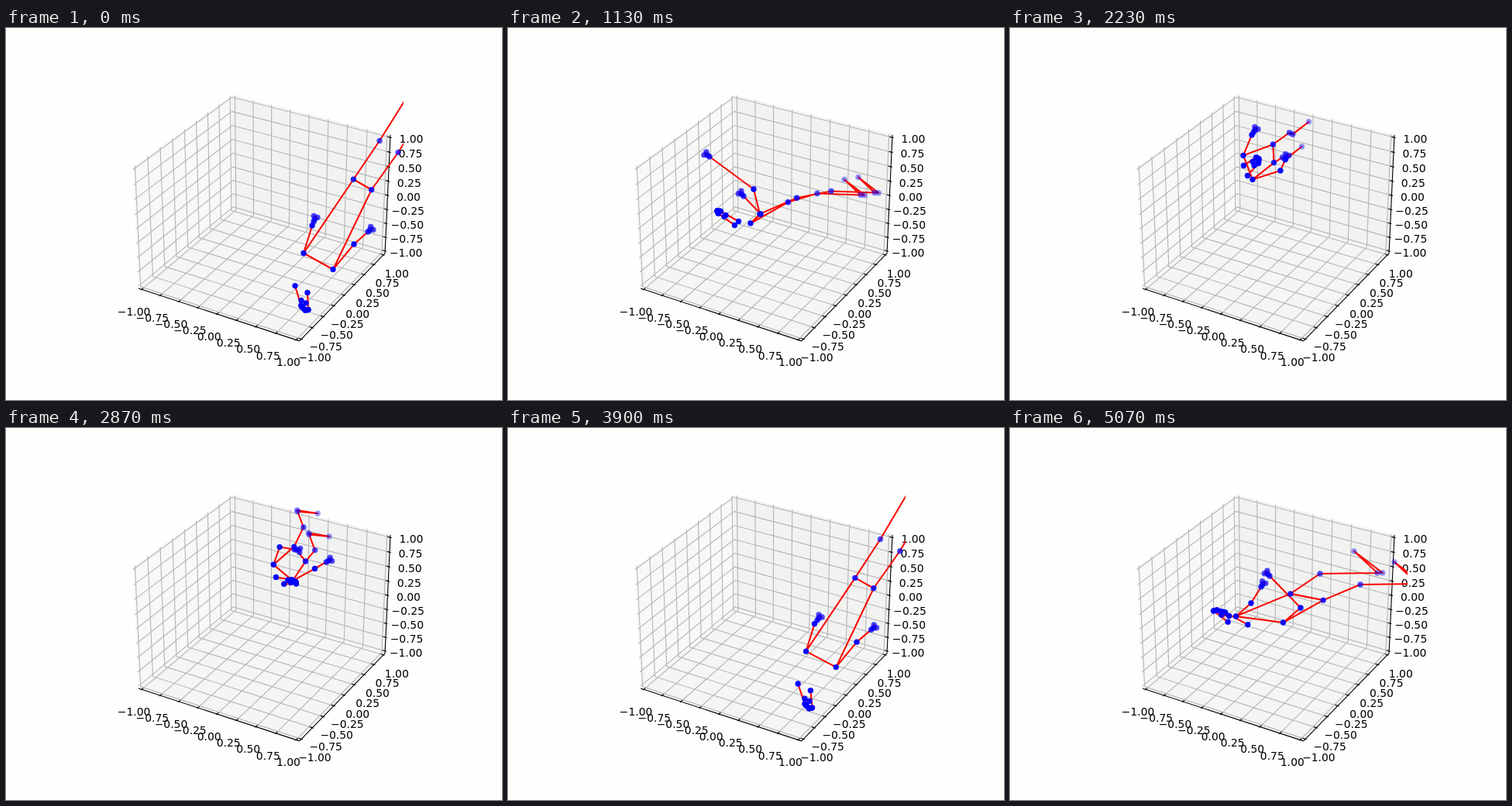
An HTML page for the animation above (5.11 s loop, 640 by 480 pixels).

```html
<!DOCTYPE html>
<html lang="en">
<head>
<meta charset="utf-8">
<title>3D pose plot</title>
<style>
  html, body { margin: 0; width: 100%; height: 100%; overflow: hidden; background: #fefefd; }
  svg { display: block; width: 100vw; height: 100vh; }
  text { font: 13.89px "DejaVu Sans", sans-serif; text-anchor: middle; }
</style>
</head>
<body>
<svg id="stage" viewBox="0 0 640 480">
  <clipPath id="axesArea"><rect x="143.2" y="57.6" width="369.6" height="369.6"/></clipPath>
  <g id="box"></g>
  <g id="figure" clip-path="url(#axesArea)">
    <path id="bones" fill="none" stroke="#fa0a00" stroke-width="2.08" stroke-linejoin="round" stroke-linecap="square"/>
  </g>
</svg>
<script>
const byId = id => document.getElementById(id);

function make(parent, tag, attrs) {
  const el = document.createElementNS('http://www.w3.org/2000/svg', tag);
  for (const key in attrs) el.setAttribute(key, attrs[key]);
  return parent.appendChild(el);
}

// ---- Axes box: perspective camera at elevation 30°, azimuth -60° ----
const EDGE = 25 / 24;
const TICKS = Array.from({ length: 9 }, (_, i) => i / 4 - 1);
const box = byId('box');

function project([x, y, z]) {
  x *= 4 / 7; y *= 4 / 7; z *= 3 / 7;
  const s = Math.sqrt(3) / 2;
  const right = s * x + y / 2;
  const up = -x / 4 + s / 2 * y + s * z;
  const scale = 1997.8 / (10 - (s / 2 * x - 0.75 * y + z / 2));
  return [333 + right * scale, 237.4 - up * scale];
}

const format = p => p.map(v => v.toFixed(2)).join(' ');
const polyline = points => 'M' + points.map(format).join('L');
const path = points => polyline(points.map(project));

function line(points, stroke) {
  make(box, 'path', { d: path(points), fill: 'none', stroke, 'stroke-width': 1.11 });
}

function pane(points, fill) {
  make(box, 'path', { d: path(points) + 'Z', fill });
}

function axis(from, to, at, tickDir, [dx, dy]) {
  line([from, to], '#000');
  for (const value of TICKS) {
    const p = at(value);
    const side = Math.sign(p[tickDir]);
    const shifted = d => p.map((v, i) => i === tickDir ? v + side * d : v);
    line([shifted(1 / 60), shifted(-1 / 30)], '#000');
    const [x, y] = project(p);
    make(box, 'text', { x: x + dx, y: Math.round(y + dy + 5) }).textContent =
      value.toFixed(2).replace('-', '\u2212');
  }
}

function drawBox() {
  const e = EDGE;
  const frontLeft = [-e, -e, -e], frontRight = [e, -e, -e];
  const backLeft = [-e, e, -e], backRight = [e, e, -e];
  const raise = ([x, y]) => [x, y, e];
  pane([frontLeft, backLeft, raise(backLeft), raise(frontLeft)], '#f8f8f7');
  pane([backLeft, backRight, raise(backRight), raise(backLeft)], '#f2f2f1');
  pane([frontLeft, frontRight, backRight, backLeft], '#f5f5f4');
  const grid = '#b5b4b8';
  for (const t of TICKS) {
    line([[t, -e, -e], [t, e, -e], [t, e, e]], grid);
    line([[e, t, -e], [-e, t, -e], [-e, t, e]], grid);
    line([[-e, -e, t], [-e, e, t], [e, e, t]], grid);
  }
  axis(frontLeft, frontRight, t => [t, -e, -e], 1, [-10, 28.7]);
  axis(frontRight, backRight, t => [e, t, -e], 0, [17.3, 23.8]);
  axis(backRight, raise(backRight), t => [e, e, t], 0, [27, 2]);
}

// ---- Key poses: centre line of the body, its widths, and the two arms ----
const stretched = {
  nose: [386, 364], ears: [381, 337], chest: [403, 301], hips: [460, 202], knees: [494, 153], ankles: [536, 86],
  foot: [10, -5], width: [38, 21], stance: [24, 15],
  elbowA: [395, 255], wristA: [397, 250], elbowB: [449, 279], wristB: [467, 263],
};
const leaning = {
  nose: [307, 291], ears: [329, 284], chest: [362, 266], hips: [429, 222], knees: [453, 195], ankles: [500, 164],
  foot: [-23, 4], width: [24, 27], stance: [11, 17],
  elbowA: [380, 227], wristA: [376, 217], elbowB: [409, 260], wristB: [415, 248],
};
const reaching = {
  nose: [270, 236], ears: [295, 252], chest: [319, 246], hips: [367, 222], knees: [408, 212], ankles: [464, 214],
  foot: [-21, -20], width: [-12, 12], stance: [-18, 3],
  elbowA: [317, 208], wristA: [260, 166], elbowB: [326, 240], wristB: [304, 217],
};
const crouching = {
  nose: [321, 169], ears: [304, 184], chest: [307, 180], hips: [340, 162], knees: [356, 151], ankles: [360, 153],
  foot: [21, -16], width: [12, 31], stance: [-9, 32],
  elbowA: [312, 138], wristA: [314, 135], elbowB: [349, 184], wristB: [355, 170],
};
const kicking = {
  nose: [416, 258], ears: [400, 238], chest: [410, 218], hips: [429, 176], knees: [444, 144], ankles: [440, 97],
  foot: [23, 17], width: [35, 10], stance: [36, 22],
  elbowA: [396, 191], wristA: [421, 194], elbowB: [447, 201], wristB: [467, 195],
};
const leaningAgain = {
  nose: [357, 288], ears: [373, 280], chest: [390, 265], hips: [425, 224], knees: [456, 196], ankles: [503, 158],
  foot: [-18, 8], width: [15, 22], stance: [6, 17],
  elbowA: [386, 234], wristA: [377, 230], elbowB: [420, 256], wristB: [426, 248],
};
const opening = {
  nose: [267, 235], ears: [294, 252], chest: [322, 247], hips: [383, 218], knees: [426, 195], ankles: [500, 194],
  foot: [-30, -28], width: [61, 8], stance: [52, 14],
  elbowA: [311, 226], wristA: [324, 205], elbowB: [375, 232], wristB: [335, 191],
};

// The movement repeats after about 118 frames
const keys = [
  [0, stretched], [13, leaning], [34, reaching], [67, crouching], [104, kicking],
  [118, stretched], [130, leaningAgain], [152, opening],
].map(([frame, pose]) => ({ frame, pose }));

// Cubic through the key poses, with slopes taken from the neighbouring keys
function poseAt(frame) {
  let i = 0;
  while (i < keys.length - 2 && frame >= keys[i + 1].frame) i++;
  const from = keys[i], to = keys[i + 1];
  const before = keys[Math.max(i - 1, 0)];
  const after = keys[Math.min(i + 2, keys.length - 1)];
  const span = to.frame - from.frame;
  const u = (frame - from.frame) / span;
  const blend = (name, k) => {
    const [a, b, c, d] = [before, from, to, after].map(key => key.pose[name][k]);
    const m = (c - a) / (to.frame - before.frame) * span;
    const n = (d - b) / (after.frame - from.frame) * span;
    const rise = c - b;
    return b + u * (m + u * (3 * rise - 2 * m - n + u * (m + n - 2 * rise)));
  };
  const pose = {};
  for (const name in from.pose) pose[name] = [blend(name, 0), blend(name, 1)];
  return pose;
}

const add = (p, v, k = 1) => [p[0] + v[0] * k, p[1] + v[1] * k];
const mix = (p, q, k) => add(p, [q[0] - p[0], q[1] - p[1]], k);

// Joints of one body half; side is -1/2 or 1/2 of the full width
function buildSide(pose, side, elbow, wrist) {
  const { nose, ears, width, stance, foot } = pose;
  const knee = add(pose.knees, stance, side);
  const ankle = add(pose.ankles, stance, side);
  const eyeInner = add(mix(nose, ears, 0.05), width, side * 0.12);
  const eye = add(mix(nose, ears, 0.12), width, side * 0.25);
  const reach = [wrist[0] - elbow[0], wrist[1] - elbow[1]];
  const unit = reach.map(v => v / (Math.hypot(...reach) || 1));
  const across = [-unit[1], unit[0]];
  const tip = add(wrist, unit, 7);
  return {
    nose, eyeInner, eye, elbow, wrist, knee, ankle,
    eyeMid: mix(eyeInner, eye, 0.5),
    ear: add(ears, width, side * 0.42),
    mouth: add(mix(nose, ears, 0.4), width, side * 0.16),
    shoulder: add(pose.chest, width, side),
    pinky: add(tip, across, 2.5),
    index: add(tip, across, -2.5),
    thumb: add(wrist, unit, 3),
    hip: add(pose.hips, mix(width, stance, 0.5), side * 0.75),
    heel: mix(knee, ankle, 1.09),
    toe: add(ankle, foot),
  };
}

const CHAINS = [
  ['shoulder', 'elbow', 'wrist', 'pinky', 'index', 'wrist', 'thumb'],
  ['shoulder', 'hip', 'knee', 'ankle', 'heel', 'toe', 'ankle'],
  ['ear', 'eye', 'eyeMid', 'eyeInner', 'nose'],
];
const FADED = { toe: 0.4, heel: 0.42, ankle: 0.48, knee: 0.68, hip: 0.85, wrist: 0.78, pinky: 0.7, index: 0.7, thumb: 0.75 };
const DOTS = [...new Set(CHAINS.flat()), 'mouth'];
const figure = byId('figure');
const makeDot = name => make(figure, 'circle', { r: 3.7, fill: '#00f', 'fill-opacity': FADED[name] || 0.95 });
const dots = [0, 1].map(() => DOTS.map(makeDot));

function drawFigure(frame) {
  const pose = poseAt(frame);
  const sides = [
    buildSide(pose, -0.5, pose.elbowA, pose.wristA),
    buildSide(pose, 0.5, pose.elbowB, pose.wristB),
  ];
  const strokes = ['shoulder', 'hip', 'mouth'].map(name => sides.map(s => s[name]));
  sides.forEach((side, i) => {
    for (const chain of CHAINS) strokes.push(chain.map(name => side[name]));
    DOTS.forEach((name, k) => {
      const [x, y] = side[name];
      dots[i][k].setAttribute('cx', x.toFixed(2));
      dots[i][k].setAttribute('cy', y.toFixed(2));
    });
  });
  byId('bones').setAttribute('d', strokes.map(polyline).join(''));
}

// ---- Playback: 30 frames per second, starts rounded to 10 ms ----
const LOOP = 5110;
const LAST_FRAME = 152;
const startTime = performance.now();

function tick() {
  const t = (performance.now() - startTime) % LOOP;
  const frame = Math.floor((Math.floor(t / 10) * 10 + 5) * 0.03);
  drawFigure(Math.min(frame, LAST_FRAME));
  requestAnimationFrame(tick);
}

drawBox();
tick();
</script>
</body>
</html>
```
